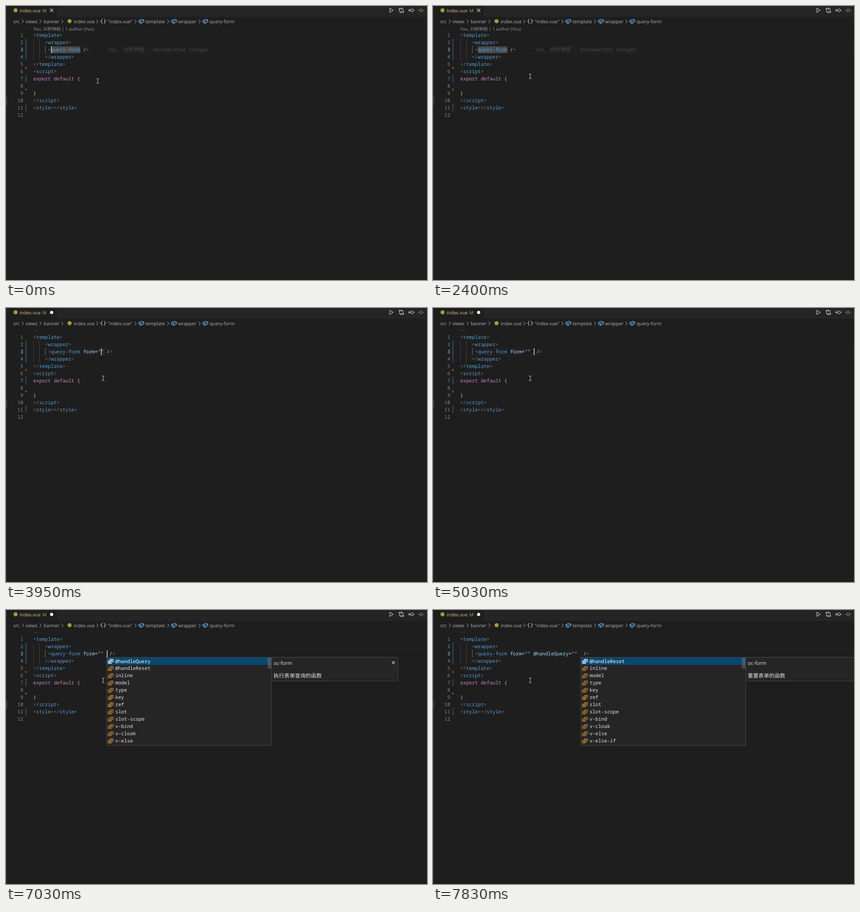
An HTML page with a canvas for the animation above (8000 ms loop, 927 px wide and 604 px high).

```html
<!DOCTYPE html>
<html lang="zh">
<head>
<meta charset="utf-8">
<title>Editor completion</title>
<style>
html, body { margin: 0; width: 100%; height: 100%; overflow: hidden; background: #1e1e1e; }
canvas { display: block; }
</style>
</head>
<body>
<canvas id="stage" width="927" height="604"></canvas>
<script>
const ctx = document.getElementById('stage').getContext('2d');
const LOOP = 8000, CHAR = 6.45, LINE = 15.96, LEFT = 60, TAG_X = LEFT + 5 * CHAR;
const MONO = '500 10.75px "Noto Sans Mono", "DejaVu Sans Mono", monospace';
const CJK = '11.8px "Noto Sans CJK SC", "Noto Sans CJK", sans-serif';
const ui = size => `${size}px "Open Sans", "Noto Sans", "Noto Sans CJK SC", sans-serif`;
const GREY = '#808080', BLUE = '#569cd6', ATTR = '#9cdcfe', TEXT = '#d4d4d4',
      BRIGHT = '#e4e4e4', PINK = '#c586c0', GOLD = '#e8c07a', CRUMB = '#b4b4b4',
      BADGE = '#a09c3c';

const lineTop = n => 56.3 + (n - 1) * LINE;
const tag = (name, open = '<') => [[open, GREY], [name, BLUE], ['>', GREY]];
const lines = [
  [0, tag('template')], [4, tag('wrapper')], [5, []], [4, tag('wrapper', '</')],
  [0, tag('template', '</')], [0, tag('script')],
  [0, [['export default ', PINK], ['{', GOLD]]], [0, []], [0, [['}', GOLD]]],
  [0, tag('script', '</')], [0, [...tag('style'), ...tag('style', '</')]], [0, []]
];
const options = ['form', '@handleQuery', '@handleReset', 'inline', 'model', 'type', 'key',
  'ref', 'slot', 'slot-scope', 'v-bind', 'v-cloak', 'v-else', 'v-else-if'];

// [start time, value]
const attrs = [[0, ''], [2870, ' '], [3950, 'form="" '], [5030, 'form=""  '],
  [7290, 'form="" @handleQuery=""  ']];
const carets = [[0, 1], [450, 0], [990, 1], [1490, 0], [1930, 11], [2400, 0], [2870, 12],
  [3210, 0], [3610, 12], [3950, 18], [4450, 0], [4700, 19], [5030, 20], [5510, 0],
  [6040, 20], [6500, 0], [7030, 20], [7290, 36], [7830, 0]];
const popups = [
  { from: 2950, to: 3950, panel: 3010, x: 170.5, note: '查询表单的数据' },
  { from: 5100, to: 7290, panel: 5170, x: 221.5, note: '执行表单查询的函数' },
  { from: 7360, to: LOOP, panel: 7430, x: 325.5, note: '重置表单的函数' }
];
// [time, x, y]
const mousePath = [[0, 202, 165], [1250, 202, 165], [1700, 167, 100], [1930, 167, 100],
  [2010, 173, 110], [2200, 214, 155], [LOOP, 214, 155]];

const at = (list, t) => list.filter(e => e[0] <= t).pop()[1];

function mouseAt(t) {
  const i = mousePath.findIndex(p => p[0] > t);
  const [t0, x0, y0] = mousePath[i - 1], [t1, x1, y1] = mousePath[i];
  const k = (t - t0) / (t1 - t0);
  return [x0 + (x1 - x0) * k, y0 + (y1 - y0) * k];
}

function rect(x, y, w, h, color) {
  ctx.fillStyle = color;
  ctx.fillRect(x, y, w, h);
}

function text(s, x, y, color, font) {
  ctx.font = font;
  ctx.fillStyle = color;
  ctx.fillText(s, x, y);
}

// Monospaced text on the character grid; returns the end position.
function mono(s, x, y, color) {
  for (const c of s) {
    text(c, x, y, color, MONO);
    x += CHAR;
  }
  return x;
}

function path(d, color, width = 1, x = 0, y = 0, fill) {
  const p = new Path2D(d);
  ctx.save();
  ctx.translate(x, y);
  if (fill) { ctx.fillStyle = fill; ctx.fill(p); }
  if (color) { ctx.strokeStyle = color; ctx.lineWidth = width; ctx.stroke(p); }
  ctx.restore();
}

function dot(x, y, r, color) {
  ctx.beginPath();
  ctx.arc(x, y, r, 0, 7);
  ctx.fillStyle = color;
  ctx.fill();
}

function cross(x, y, r, color) {
  path(`M${-r} ${-r}L${r} ${r}M${r} ${-r}L${-r} ${r}`, color, 1.2, x, y);
}

function drawHeader(edited) {
  rect(0, 0, 927, 24, '#252526');
  rect(3, 0, 109, 24, '#1e1e1e');
  rect(0, 0, 2.5, 604, '#252526');
  rect(0, 201, 2.5, 18, '#37424d');
  rect(0, 43, 2, 1, '#444');
  rect(0, 588, 2, 1, '#444');

  dot(21, 9.5, 4.5, BADGE);
  text('index.vue', 30, 14, '#e2c08d', ui(10.3));
  text('M', 80, 14, '#b0986f', ui(10.3));
  if (edited) dot(100.5, 9.7, 3.5, '#fff');
  else cross(100.5, 9.5, 3.6, '#e8e8e8');

  const c = '#c5c5c5';
  path('M-3.5 -4.5L4 0L-3.5 4.5Z', c, 1.1, 848.5, 9.5);
  path('M-4 -2V2Q-4 4 -2 4H1M-1 2L1 4L-1 6M4 2V-2Q4 -4 2 -4H-1M1 -6L-1 -4L1 -2' +
    'M-5.3 -3.5a1.4 1.4 0 1 0 2.8 0a1.4 1.4 0 1 0 -2.8 0M2.6 3.7a1.4 1.4 0 1 0 2.8 0a1.4 1.4 0 1 0 -2.8 0',
    c, 1.1, 870.5, 9.5);
  const ring = 'M-2 0a3 3 0 1 0 6 0a3 3 0 1 0 -6 0M4 0H6.5M-2 0H-6.5';
  path(ring + 'M-4 -2.5L-6.5 0L-4 2.5', c, 1.1, 893, 9.5);
  path('M-3 0a3 3 0 1 0 6 0a3 3 0 1 0 -6 0M3 0H6.5M-3 0H-6.5', '#858585', 1.1, 914, 9.5);
}

function drawCrumbs() {
  const items = [['src', 16], ['views', 43], ['banner', 83], ['index.vue', 149],
    ['"index.vue"', 224], ['template', 307], ['wrapper', 379], ['query-form', 448.5]];
  for (const [s, x] of items) text(s, x, 38, CRUMB, ui(10.3));
  for (const x of [37, 76, 124, 201, 285, 357, 426])
    path('M-2 -4L2 0L-2 4', CRUMB, 1, x, 34);
  for (const x of [298, 370, 439])
    path('M-5.5 -1.5L1 -4.5L5.5 -2.5V1.5L-1 4.8L-5.5 2.5ZM-5.5 -1.5L-1 0.5L5.5 -2.5M-1 0.5V4.8',
      '#75beff', 1.1, x, 33.5);
  dot(140, 33.5, 4.5, BADGE);
  path('M-1.5 -4.5Q-3.5 -4.5 -3.5 -2.5T-5 0Q-3.5 0 -3.5 2.5T-1.5 4.5' +
    'M1.5 -4.5Q3.5 -4.5 3.5 -2.5T5 0Q3.5 0 3.5 2.5T1.5 4.5', '#c5c5c5', 1.1, 214, 33.5);
}

function drawCode(t) {
  const lens = t < 3010;
  if (lens) {
    text('You, 35秒钟前 | 1 author (You)', LEFT, 53.7, '#999', ui(9.5));
  } else {
    for (let i = 0; i < 3; i++) rect(61 + i * 3.2, 48.5, 1.2, 1.2, '#808080');
  }

  rect(LEFT, 89, 867, 1, '#282828');
  rect(LEFT, 103, 867, 1, '#282828');
  if (t < 2870) rect(99, 89, 64.5, 15, '#494b4c');
  rect(60, 72, 1, 48, '#404040');
  rect(73, 72, 1, 48, '#404040');
  rect(86, 88, 1, 16, '#747474');

  lines.forEach(([indent, runs], i) => {
    const n = i + 1, y = lineTop(n) + 11.8;
    mono(String(n), 38 - CHAR * String(n).length, y, n === 3 ? '#c6c6c6' : '#858585');
    let x = LEFT + indent * CHAR;
    for (const [s, color] of runs) x = mono(s, x, y, color);
  });
  for (const n of [2, 3, 4, 7, 11])
    for (let y = 0; y < 15; y += 2) path('M0 1.5L2.5 0', '#2478a8', 1, 42.7, lineTop(n) + y);
  for (const y of [136.5, 184.3]) path('M0 -3L3.5 0L0 3Z', null, 0, 42.5, y, '#c2483e');

  const y = lineTop(3) + 11.8;
  let x = mono('<', TAG_X, y, GREY);
  x = mono('query-form', x, y, BLUE) + CHAR;
  for (const part of at(attrs, t).match(/=""|[^=]+/g) || [])
    x = mono(part, x, y, part[0] === '=' ? TEXT : ATTR);
  x = mono('/', x, y, TEXT);
  x = mono('>', x, y, GREY);
  if (lens) {
    const dim = '#4b4b4b';
    x = mono('You, 38', x + 41.8, y, dim);
    text('秒钟前', x, y, dim, CJK);
    mono(' • Uncommitted changes', x + 35.4, y, dim);
  }

  if (t >= 3950 && t < 4700) rect(215, 89, 1, 15, '#525252');
  const col = at(carets, t);
  if (col) rect(TAG_X + col * CHAR + 0.6, 89, 1.6, 15, '#d0d0d0');
}

// Returns whether the pointer is over the list.
function drawPopup(t) {
  const start = popups.findIndex(p => t >= p.from && t < p.to);
  if (start < 0) return false;
  const { x, panel, note } = popups[start];
  const open = t >= panel;

  function frame(left, width, height) {
    rect(left, 104.5, width, height, '#252526');
    ctx.strokeStyle = '#454545';
    ctx.lineWidth = 1;
    ctx.strokeRect(left, 104.5, width, height);
  }

  if (open) {
    frame(x + 363, 278.5, 52);
    text('oc-form', x + 367.5, 121, BRIGHT, ui(11.2));
    text(note, x + 367.5, 149.3, BRIGHT, CJK);
    cross(x + 631.5, 116, 3.3, BRIGHT);
  }
  frame(x, 363, 194);
  rect(x + 0.5, 105, 362, 16, '#094771');
  if (start === 0) rect(x + 0.5, 153, 362, 16, '#2a2d2e');
  options.slice(start, start + 12).forEach((s, i) => {
    const y = 112.8 + i * LINE;
    path('M-1.5 -1V-4.5H5.5V1H2.5M0.5 -2.5H4M-5.5 -1H1.5V4.5H-5.5ZM-4 1H0M-4 2.8H0',
      i ? '#d48f2c' : '#fff', 1.1, x + 9, y + 0.3);
    mono(s, x + 19.2, y + 3.7, i ? BRIGHT : '#fff');
  });
  if (open) rect(x + 354.5, 105, 8, 24, 'rgba(121,121,121,.45)');
  return start === 0;
}

function drawMouse(t, hand) {
  const [x, y] = mouseAt(t);
  if (hand) {
    path('M-1.2 1Q0 -1.2 1.2 1V5Q2.4 4 3.2 5.4Q4.6 4.6 5.2 6Q6.6 5.6 6.6 7V10L5 14H-1.5' +
      'L-4.6 9Q-4.8 7.4 -3 7.8L-1.2 9.4Z', '#111', 0.8, x - 1, y - 1, '#fff');
  } else {
    path('M-2.8 -5H-0.8L0 -4.4L0.8 -5H2.8M0 -4.4V4.4M-2.8 5H-0.8L0 4.4L0.8 5H2.8',
      '#d0d0d0', 1, x, y);
  }
}

function draw(now) {
  const t = now % LOOP;
  ctx.textRendering = 'geometricPrecision';
  rect(0, 0, 927, 604, '#1e1e1e');
  drawHeader(t >= 2870);
  drawCrumbs();
  drawCode(t);
  drawMouse(t, drawPopup(t));
  requestAnimationFrame(draw);
}
requestAnimationFrame(draw);
</script>
</body>
</html>
```
